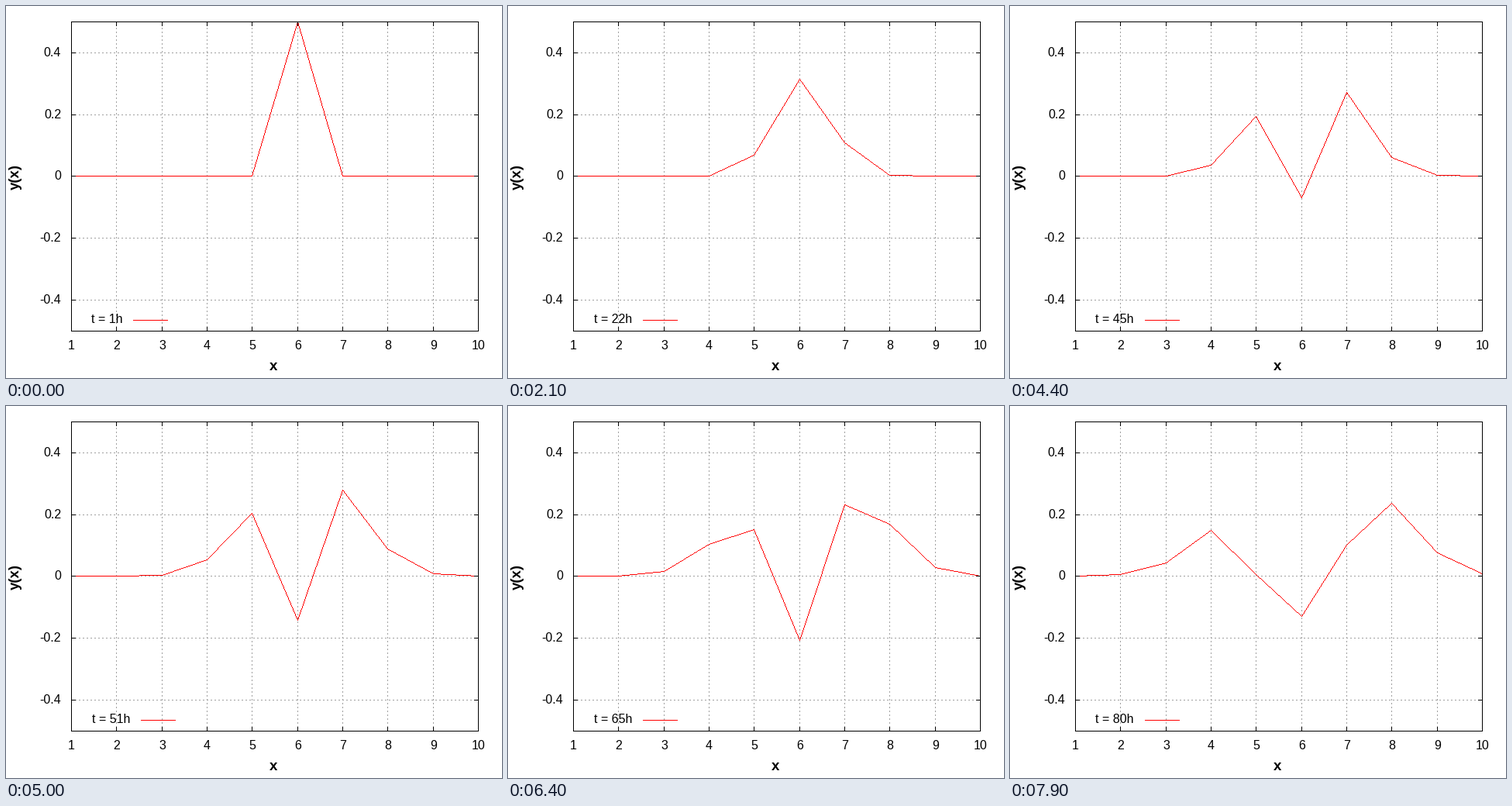
Recreate the animation shown at these times as a matplotlib script. Size 640 px wide and 480 px high, loop 8000 ms.

```python
import numpy as np
import matplotlib.pyplot as plt
from matplotlib.animation import FuncAnimation

W, H, DPI = 640, 480, 100
PX = 72 / DPI  # points per pixel
LEFT, RIGHT, TOP, BOTTOM = 84, 609, 20, 419
FRAMES = 80
RED, GRID, BLACK = (255, 0, 0), (160, 160, 160), (0, 0, 0)
TICK = 5

plt.rcParams["font.family"] = "Liberation Sans"


def nearest(v):
    return np.ceil(np.asarray(v) - 0.5).astype(int)


def col(x):
    return nearest(LEFT + (RIGHT - LEFT) * (np.asarray(x) - 1) / 9)


def row(y):
    return nearest(BOTTOM - (BOTTOM - TOP) * (np.asarray(y) + 0.5))


def stroke(img, x0, y0, x1, y1, color=BLACK, on=1, off=0):
    """One pixel wide hard-edged line, optionally dashed."""
    n = max(abs(x1 - x0), abs(y1 - y0)) + 1
    k = np.arange(n)
    k = k[k % (on + off) < on]
    cols = nearest(np.linspace(x0, x1, n))[k]
    rows = nearest(np.linspace(y0, y1, n))[k]
    img[rows, cols] = color


def force(y):
    """Chain with quadratic springs and fixed walls at both ends."""
    d = -np.diff(np.concatenate(([0], y, [0])))
    f = d + 0.5 * d ** 2
    return f[:-1] - f[1:]


def simulate(step=0.0307, sub=4):
    y, v = np.zeros(10), np.zeros(10)
    y[5] = 0.5
    dt = step / sub
    states = [y.copy()]
    for _ in range(FRAMES - 1):
        for _ in range(sub):
            v += force(y) * dt / 2
            y += v * dt
            v += force(y) * dt / 2
        states.append(y.copy())
    return states


states = simulate()
xs = col(np.arange(1, 11))
y_ticks = (-0.4, -0.2, 0, 0.2, 0.4)


def draw_grid(img):
    for x in xs[1:-1]:
        stroke(img, x, BOTTOM, x, TOP, GRID, 2, 3)
    for y in row(y_ticks):
        stroke(img, LEFT, y, RIGHT, y, GRID, 2, 3)


def draw_frame(img):
    for x in xs:
        stroke(img, x, BOTTOM, x, BOTTOM - TICK)
        stroke(img, x, TOP, x, TOP + TICK)
    for y in row(y_ticks):
        stroke(img, LEFT, y, LEFT + TICK, y)
        stroke(img, RIGHT, y, RIGHT - TICK, y)
    for y in (TOP, BOTTOM):
        stroke(img, LEFT, y, RIGHT, y)
    for x in (LEFT, RIGHT):
        stroke(img, x, TOP, x, BOTTOM)


grid = np.full((H, W, 3), 255, np.uint8)
draw_grid(grid)

fig = plt.figure(figsize=(W / DPI, H / DPI), dpi=DPI, facecolor="white")
ax = fig.add_axes([0, 0, 1, 1])
ax.axis("off")
canvas = ax.imshow(grid, extent=(0, W, H, 0), aspect="auto",
                   interpolation="nearest")


def label(x, y, s, size=16, **kw):
    return ax.text(x, y, s, fontsize=size * PX, va="baseline", **kw)


for i, x in enumerate(xs, 1):
    label(x + 0.5, 443, str(i), ha="center")
for v in y_ticks:
    label(71, row(v) + 5, f"{v:g}", ha="right")
title = dict(size=56 / 3, weight="bold", ha="center")
label(345, 470, "x", **title)
label(17, 220.5, "y(x)", rotation=90, rotation_mode="anchor", **title)
key = label(150, 409, "", ha="right")


def draw(n):
    img = grid.copy()
    ys = row(states[n])
    for seg in zip(xs[:-1], ys[:-1], xs[1:], ys[1:]):
        stroke(img, *seg, RED)
    shift = 10 * (n + 1 >= 10)
    stroke(img, 164 + shift, 405, 208 + shift, 405, RED)
    draw_frame(img)
    canvas.set_data(img)
    key.set_text(f"t = {n + 1}h")
    key.set_x(150 + shift)
    return canvas, key


anim = FuncAnimation(fig, draw, frames=FRAMES, interval=100,
                     init_func=lambda: draw(0), repeat=True, repeat_delay=0)
plt.show()
```
